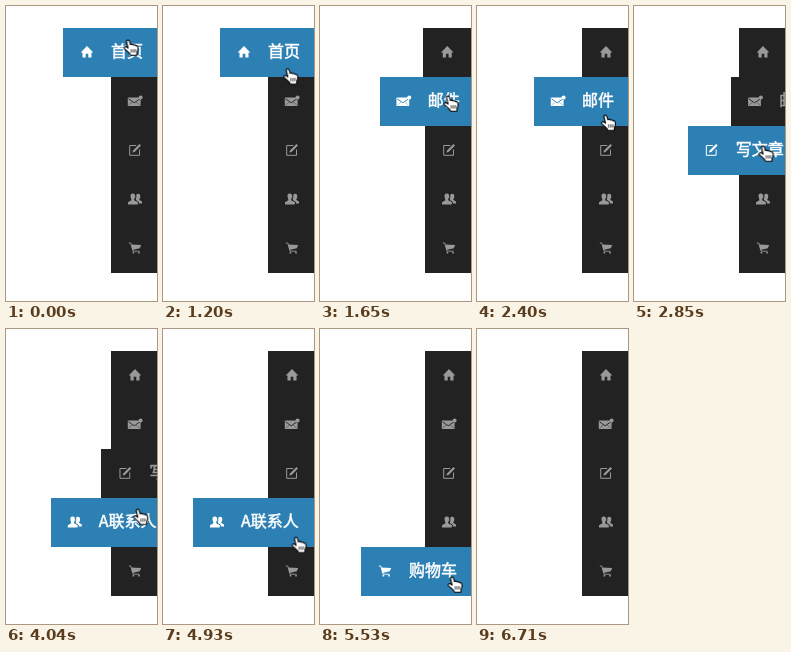
Recreate the animation shown at these times as an HTML page. Size 151 px wide and 295 px high, loop 7100 ms.

```html
<!DOCTYPE html>
<html lang="zh-CN">
<head>
<meta charset="utf-8">
<title>侧边菜单</title>
<style>
html, body { margin: 0; width: 100%; height: 100%; overflow: hidden; background: #fefefe; }
svg { display: block; width: 151px; height: 295px; }
text {
  font: 500 16px "Noto Sans CJK SC", "Noto Sans CJK", sans-serif;
  stroke: currentColor;
  stroke-width: .5px;
}

.row {
  --bg: #222;
  color: #999;
  animation:
    slide 500ms ease calc(var(--in) - var(--t)) both paused,
    back 500ms ease calc(var(--out) - var(--t)) forwards paused,
    lit calc(var(--out) - var(--in)) linear calc(var(--in) - var(--t)) paused;
}
.row > rect { fill: var(--bg); }
.row text, .solid { fill: currentColor; }
.line { fill: none; stroke: currentColor; }
.cut { fill: none; stroke: var(--bg); }

@keyframes slide {
  from { transform: translateX(0); }
  to { transform: translateX(var(--w)); }
}
@keyframes back {
  from { transform: translateX(var(--w)); }
  to { transform: translateX(0); }
}
@keyframes lit {
  from, to { --bg: #2d80b4; color: #fff; }
}

#hand { animation: roam 7100ms linear calc(0ms - var(--t)) both paused; }
@keyframes roam {
  0%, 12.4% { transform: translate(122.5px, 34px); }
  18.2% { transform: translate(126px, 71px); }
  22%, 28.9% { transform: translate(128.5px, 90px); }
  36.6% { transform: translate(129px, 120px); }
  40.1% { transform: translate(129.5px, 140px); }
  41.5%, 49.7% { transform: translate(129.5px, 142px); }
  53.4% { transform: translate(131px, 169px); }
  56.9% { transform: translate(132.2px, 180.2px); }
  60%, 66.5% { transform: translate(133px, 188px); }
  69.4% { transform: translate(133.5px, 208px); }
  70.7% { transform: translate(133.5px, 217.5px); }
  76%, 83.6% { transform: translate(132.5px, 248px); }
  86.7% { transform: translate(131px, 267px); }
  91.5%, 100% { transform: translate(130px, 298px); }
}
:root { --t: 0ms; }
</style>
</head>
<body>
<svg viewBox="0 0 151 295">
  <rect x="105" y="22" width="46" height="245" fill="#222"/>

  <g transform="translate(105 22)">
    <g class="row" style="--w:-48px; --in:-1000ms; --out:1270ms">
      <rect width="130" height="49"/>
      <path class="solid" transform="translate(24 24)" d="M0-6 6.3.5H4.5V5.5H1.3V1.8H-1.3V5.5H-4.5V.5H-6.3Z"/>
      <text x="48" y="29.3">首页</text>
    </g>
  </g>

  <g transform="translate(105 71)">
    <g class="row" style="--w:-48px; --in:1295ms; --out:2580ms">
      <rect width="130" height="49"/>
      <g transform="translate(24 24)">
        <rect class="solid" x="-7.2" y="-3.4" width="12.8" height="8.4" rx=".6"/>
        <path class="cut" stroke-width=".9" d="M-6.5-2.2-.8 1.8 5-2.2"/>
        <path class="cut" stroke-width=".4" d="M-6.3 4-2.6 1M4.8 4 1 1"/>
        <circle class="solid" cx="5.6" cy="-3.5" r="2"/>
      </g>
      <text x="48" y="29.3">邮件</text>
    </g>
  </g>

  <g transform="translate(105 120)">
    <g class="row" style="--w:-64px; --in:2600ms; --out:3765ms">
      <rect width="130" height="49"/>
      <g transform="translate(24 24)">
        <path class="line" d="M1.2-4.5H-5.3V5.3H4.5V-.5"/>
        <path class="solid" d="M-2.6 2.4-2 .4 4.4-6 6-4.4-.4 1.9Z"/>
      </g>
      <text x="48" y="29.3">写文章</text>
    </g>
  </g>

  <g transform="translate(105 169)">
    <g class="row" style="--w:-75px; --in:3790ms; --out:5000ms">
      <rect width="130" height="49"/>
      <g transform="translate(24 24)">
        <path class="solid" d="M3-5.2C5-5.2 5.6-3.6 5.2-1.8 5-.6 4.3 0 4.3 1L7 2.6V4.4H1V1C0-1 0-5.2 3-5.2Z"/>
        <path class="solid" d="M-2.2-5.6C-.2-5.6.4-4 0-2-.3-.6-.8.2-.8 1.2L2.8 3.2V5.4H-7V3.2L-3.6 1.2C-3.6.2-4.1-.6-4.4-2-4.8-4-4.2-5.6-2.2-5.6Z"/>
        <path class="cut" d="M.8-5.2Q1.4-1.4 0 1L3.4 3V5.5"/>
      </g>
      <text x="48" y="29.3">A联系人</text>
    </g>
  </g>

  <g transform="translate(105 218)">
    <g class="row" style="--w:-64px; --in:5020ms; --out:6160ms">
      <rect width="130" height="49"/>
      <g transform="translate(24 24)">
        <path class="line" stroke-width=".9" d="M-6.2-5H-4.2L-2 3.2H4.6"/>
        <path class="solid" d="M-3.8-3.4 6.2-3 4.8.2-2.6 1.9Z"/>
        <circle class="solid" cx="-1.6" cy="4.7" r=".9"/>
        <circle class="solid" cx="4" cy="4.7" r=".9"/>
      </g>
      <text x="48" y="29.3">购物车</text>
    </g>
  </g>

  <g id="hand" stroke="#000" stroke-linejoin="round">
    <path fill="#fff" stroke-width="1.1" d="M-1.9 2C-2.4 0 .1-.7.9 1.1L2 4.6Q3.6 3.6 4.6 5 6.4 4.2 7.2 5.8 9 5.2 9.4 7.4 10 10 8.6 12.2L8.4 15.2H2Q1.4 13.4-.2 12.2L-4 8.8C-5 7-3 6-1.6 7.2L-.4 8.2Z"/>
    <path fill="none" stroke-width=".8" d="M2.8 9.2V12.6M4.9 9.2V12.6M6.9 9.2V12.4"/>
  </g>
</svg>
<script>
const LOOP = 7100;
// [start, end, step] of each stretch of movement, in ms
const moves = [
  [900, 1800, 150],
  [2100, 3150, 150],
  [3590, 4340, 150],
  [4780, 5680, 150],
  [5970, 6710, 148]
];

function held(t) {
  const move = moves.filter(m => m[0] <= t).pop();
  if (!move) return 0;
  const [start, end, step] = move;
  return Math.min(end, start + Math.floor((t - start) / step) * step);
}

const begin = performance.now();
let last = -1;

function draw() {
  const t = held((performance.now() - begin) % LOOP);
  if (t !== last) {
    document.documentElement.style.setProperty('--t', t + 'ms');
    last = t;
  }
  requestAnimationFrame(draw);
}
draw();
</script>
</body>
</html>
```
